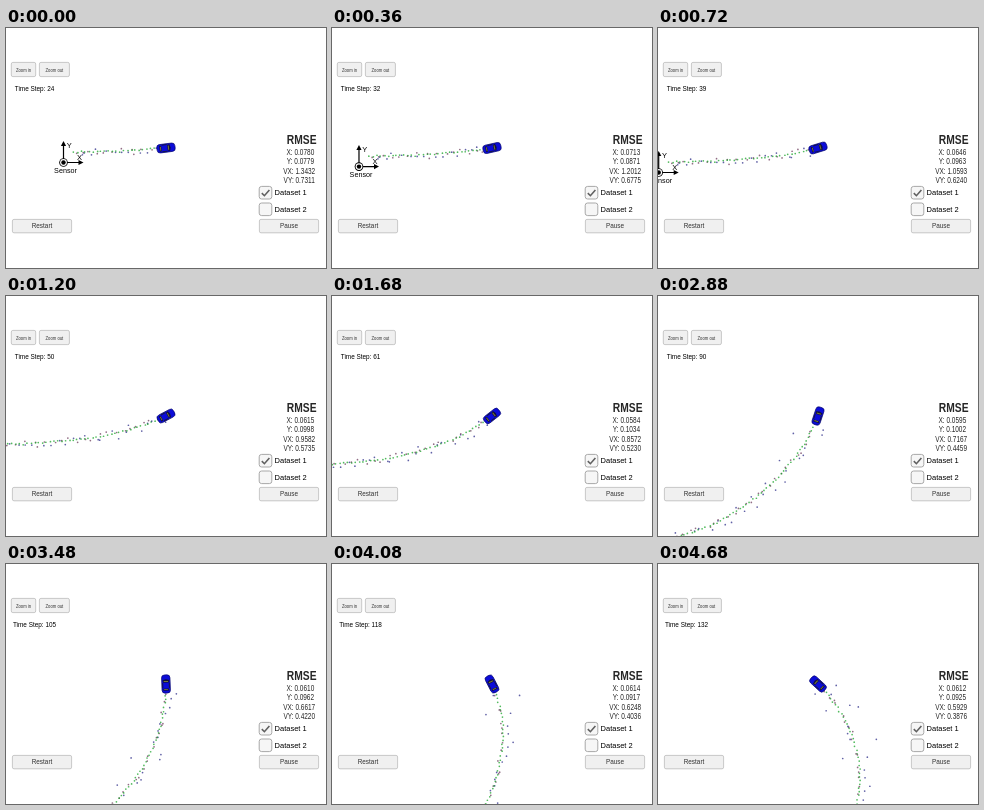
Write an HTML page with a canvas that moves like this. It is 320 by 240 pixels and loops after 4.8 s.

```html
<!DOCTYPE html>
<html lang="en">
<head>
<meta charset="utf-8">
<title>Sensor fusion tracking</title>
<style>
html, body { margin: 0; width: 100%; height: 100%; overflow: hidden; background: #fff; }
canvas { display: block; width: 320px; height: 240px; }
</style>
</head>
<body>
<canvas id="stage"></canvas>
<script>
const canvas = document.getElementById('stage');
const ctx = canvas.getContext('2d');
const dpr = window.devicePixelRatio || 1;
canvas.width = 320 * dpr;
canvas.height = 240 * dpr;

const TICK = 120, TICKS = 40, SPEED = 3.85, LAST = 132;
const FONT = '"Liberation Sans", Arial, sans-serif';
const CAR = { x: 160, y: 120 };

// Key ticks with the step counter, heading in degrees and error values there
const keyTicks = [0, 6, 14, 20, 29, 34, 39];
const keySteps = [24, 39, 61, 78, 105, 118, 132];
const headings = [5, 15, 36, 53, 90, 115, 135];
const errors = {
  X: [0.0780, 0.0646, 0.0584, 0.0583, 0.0610, 0.0614, 0.0612],
  Y: [0.0779, 0.0963, 0.1034, 0.1034, 0.0962, 0.0917, 0.0925],
  VX: [1.3432, 1.0593, 0.8572, 0.7607, 0.6617, 0.6248, 0.5929],
  VY: [0.7311, 0.6240, 0.5230, 0.4650, 0.4220, 0.4036, 0.3876]
};

function lerpKeys(keys, values, at) {
  let i = 0;
  while (i < keys.length - 2 && at > keys[i + 1]) i++;
  const u = (at - keys[i]) / (keys[i + 1] - keys[i]);
  return values[i] + (values[i + 1] - values[i]) * u;
}

const heading = k => lerpKeys([0, ...keySteps], [0, ...headings], k) * Math.PI / 180;

// Integrate the drive, y pointing down
const path = [{ x: 0, y: 0 }];
for (let k = 1; k <= LAST; k++) {
  const a = heading(k - 0.5), p = path[k - 1];
  path.push({ x: p.x + SPEED * Math.cos(a), y: p.y - SPEED * Math.sin(a) });
}
const sensor = { x: path[24].x - 102.5, y: path[24].y + 14.5 };

let seed = 17;
function rand() {
  seed = (seed * 16807) % 2147483647;
  return seed / 2147483647;
}
const noise = s => (rand() + rand() + rand() - 1.5) * s;

// Laser readings stay close, radar readings scatter sideways with distance
const estimates = path.map(p => ({ x: p.x + noise(0.9), y: p.y + noise(0.9) }));
const readings = path.map((p, k) => {
  const radar = k % 2, a = heading(k);
  const side = noise(radar ? 3 + k / 8 : 3), along = noise(4);
  return {
    x: p.x + along * Math.cos(a) + side * Math.sin(a),
    y: p.y - along * Math.sin(a) + side * Math.cos(a),
    color: radar ? '#2c2c88' : '#6c3c5c'
  };
});

function dot(x, y, r, color) {
  ctx.fillStyle = color;
  ctx.beginPath();
  ctx.arc(x, y, r, 0, 7);
  ctx.fill();
}

function text(str, x, y, size, { color = '#000', align = 'center', weight = '', squeeze = 1 } = {}) {
  ctx.save();
  ctx.translate(x, y);
  ctx.scale(squeeze, 1);
  ctx.font = `${weight} ${size}px ${FONT}`;
  ctx.textAlign = align;
  ctx.fillStyle = color;
  ctx.fillText(str, 0, 0);
  ctx.restore();
}

function box(x, y, w, h, r, fill, stroke, line = 0.8) {
  ctx.beginPath();
  ctx.roundRect(x, y, w, h, r);
  ctx.fillStyle = fill;
  ctx.fill();
  ctx.lineWidth = line;
  ctx.strokeStyle = stroke;
  ctx.stroke();
}

function poly(points, color) {
  ctx.fillStyle = color;
  ctx.beginPath();
  points.forEach(([x, y]) => ctx.lineTo(x, y));
  ctx.fill();
}

function drawSensor() {
  ctx.save();
  ctx.translate(sensor.x, sensor.y);
  ctx.strokeStyle = '#000';
  ctx.lineWidth = 1.2;
  ctx.beginPath();
  ctx.moveTo(0, -18);
  ctx.lineTo(0, 0);
  ctx.lineTo(16, 0);
  ctx.stroke();
  poly([[0, -21.5], [-2.6, -16.5], [2.6, -16.5]], '#000');
  poly([[20, 0], [15, -2.6], [15, 2.6]], '#000');
  dot(0, 0, 4.3, '#000');
  dot(0, 0, 3.4, '#fff');
  dot(0, 0, 2.2, '#000');
  text('Y', 5.7, -14.5, 7.5);
  text('X', 16, -2.5, 7.5);
  text('Sensor', 2, 10.8, 7.2);
  ctx.restore();
}

function drawTrail(step) {
  ctx.globalAlpha = 0.75;
  for (let k = 0; k < step; k++) {
    const m = readings[k], e = estimates[k];
    dot(m.x, m.y, 0.85, m.color);
    dot(e.x, e.y, 0.85, '#18a428');
  }
  ctx.globalAlpha = 1;
}

function drawCar(angle) {
  ctx.save();
  ctx.translate(CAR.x, CAR.y);
  ctx.rotate(-angle);
  box(-9.1, -4.2, 18.2, 8.4, 3, '#0c0cd8', '#080870', 0.7);
  poly([[1.4, -2.8], [3.8, -3.4], [4.7, 0], [3.8, 3.4], [1.4, 2.8]], '#101038');
  poly([[-6.6, -3], [-4.6, -2.6], [-4.6, 2.6], [-6.6, 3]], '#101038');
  ctx.fillStyle = '#14144c';
  ctx.fillRect(-4, -3.8, 5, 1);
  ctx.fillRect(-4, 2.8, 5, 1);
  ctx.fillStyle = '#77763c';
  ctx.fillRect(2, -2.2, 1, 4.4);
  ctx.fillRect(-5.9, -2, 0.9, 4);
  ctx.restore();
}

function button(label, x, y, w, h, size, squeeze) {
  box(x, y, w, h, 1.6, '#f0f0f0', '#bcbcbc');
  text(label, x + w / 2, y + h / 2 + size * 0.36, size, { color: '#333', squeeze });
}

function checkbox(label, y, on) {
  box(253.2, y, 12.6, 12.6, 2.4, '#f6f6f6', '#a0a0a0', 0.9);
  if (on) {
    ctx.strokeStyle = '#606060';
    ctx.lineWidth = 1.6;
    ctx.beginPath();
    ctx.moveTo(255.8, y + 6.7);
    ctx.lineTo(258.4, y + 9.3);
    ctx.lineTo(263.4, y + 3.5);
    ctx.stroke();
  }
  text(label, 268.6, y + 8.8, 7.5, { align: 'left' });
}

function drawPanel(tick, step) {
  button('Zoom in', 5.3, 34.4, 24.4, 14.2, 6.2, 0.68);
  button('Zoom out', 33.4, 34.4, 30, 14.2, 6.2, 0.68);
  text('Time Step: ' + step, 28.5, 62.6, 6.4);

  text('RMSE', 295.7, 115.8, 13, { color: '#262626', weight: 'bold', squeeze: 0.79 });
  const rows = [126.8, 135.6, 146, 154.8];
  Object.entries(errors).forEach(([name, values], i) => {
    const v = lerpKeys(keyTicks, values, tick).toFixed(4);
    text(`${name}: ${v}`, i < 2 ? 294.4 : 293.2, rows[i], 8.8, { color: '#262626', squeeze: 0.735 });
  });

  checkbox('Dataset 1', 158.4, true);
  checkbox('Dataset 2', 175, false);
  button('Restart', 6.4, 191.4, 59.2, 13.4, 6.4, 1);
  button('Pause', 253.4, 191.4, 59.2, 13.4, 6.4, 1);
}

function draw(ms) {
  const tick = Math.floor(ms / TICK) % TICKS;
  const step = Math.round(lerpKeys(keyTicks, keySteps, tick));
  ctx.setTransform(dpr, 0, 0, dpr, 0, 0);
  ctx.fillStyle = '#fff';
  ctx.fillRect(0, 0, 320, 240);
  ctx.save();
  ctx.translate(CAR.x - path[step].x, CAR.y - path[step].y);
  drawSensor();
  drawTrail(step);
  ctx.restore();
  drawCar(heading(step) + 0.04);
  drawPanel(tick, step);
}

const start = performance.now();
function loop() {
  draw(performance.now() - start);
  requestAnimationFrame(loop);
}
loop();
</script>
</body>
</html>
```
